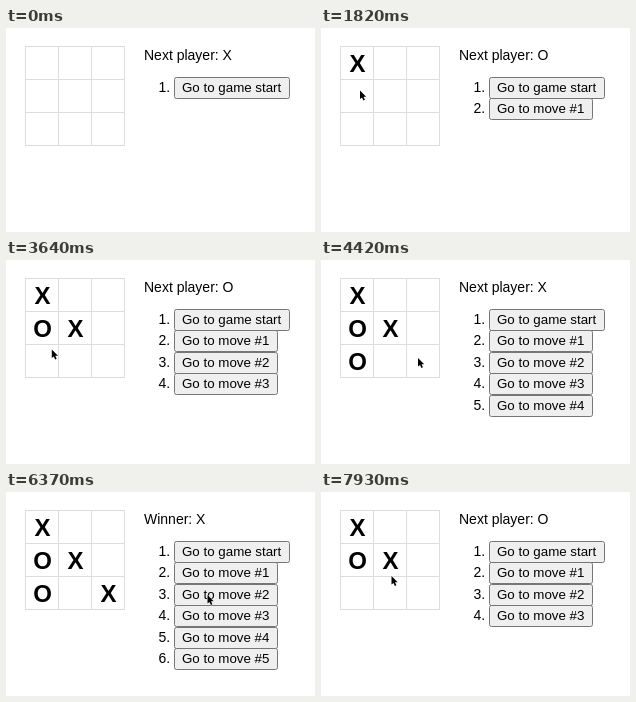
Animation of 309x204 px, one loop 8 s. Source, as an HTML page:

```html
<!DOCTYPE html>
<html lang="en">
<head>
<meta charset="utf-8">
<title>Tic-tac-toe with history</title>
<style>
  html, body { margin: 0; width: 100%; height: 100%; overflow: hidden; background: #fff; }
  svg { display: block; width: 309px; height: 204px; }
  text { font: 14px "Liberation Sans", Arial, sans-serif; fill: #000; }
  .label { font-size: 13.333px; }
  .mark { font-size: 24px; font-weight: bold; text-anchor: middle; }
  .grid { fill: none; stroke: #ddd; }
  .button { fill: #efefef; stroke: #767676; }
  .cursor { fill: #000; stroke: #fff; stroke-width: 1; paint-order: stroke; stroke-linejoin: round; }
</style>
</head>
<body>
<svg viewBox="0 0 309 204">
  <path class="grid" d="M19 18.5H119M19 51.5H119M19 84.5H119M19 117.5H119M19.5 18V118M52.5 18V118M85.5 18V118M118.5 18V118"/>
  <g id="marks"></g>
  <text id="status" x="138" y="32"></text>
  <g id="history"></g>
  <path id="cursor" class="cursor" d="M0 0V8.6L2 6.9L3.4 10L4.9 9.3L3.5 6.3H6.2Z"/>
</svg>
<script>
  const LOOP = 8000, TICK = 130;
  const $ = id => document.getElementById(id);

  // Board squares in order of play; X starts.
  const moves = [0, 3, 4, 6, 8];

  // [time, moves on the board, history buttons]
  const states = [
    [0, 0, 1], [1430, 1, 2], [2600, 2, 3], [3380, 3, 4],
    [4030, 4, 5], [4940, 5, 6], [6760, 2, 6], [7670, 3, 4]
  ];

  // [time, x, y] of the pointer tip
  const path = [
    [130, 3, 156], [780, 38, 38], [1430, 38, 38], [1820, 39, 62.5],
    [2080, 41, 71], [2600, 41, 71], [2990, 48.5, 74], [3380, 68, 68],
    [3770, 38, 97], [4030, 38, 97], [4420, 97, 98], [5070, 97, 98],
    [5590, 133, 92], [5980, 180, 97], [6370, 201.5, 103], [6500, 203, 104],
    [6760, 203, 104], [7540, 69, 70], [7670, 69, 70], [7930, 70.5, 84]
  ];

  function add(parent, tag, attrs, content = "") {
    const el = document.createElementNS("http://www.w3.org/2000/svg", tag);
    for (const key in attrs) el.setAttribute(key, attrs[key]);
    el.textContent = content;
    parent.append(el);
    return el;
  }

  const player = i => (i % 2 ? "O" : "X");

  const marks = moves.map((square, i) => add($("marks"), "text", {
    class: "mark",
    x: 36.5 + 33 * (square % 3),
    y: 44 + 33 * Math.floor(square / 3)
  }, player(i)));

  const rows = Array.from({ length: 6 }, (_, i) => {
    const row = add($("history"), "g", {});
    const top = Math.round(49 + 21.4 * i);
    add(row, "text", { x: 152.4, y: top + 15 }, `${i + 1}.`);
    add(row, "rect", { class: "button", x: 168.5, y: top + 0.5, width: i ? 103 : 115, height: 21, rx: 2 });
    add(row, "text", { class: "label", x: 176, y: top + 15 }, i ? `Go to move #${i}` : "Go to game start");
    return row;
  });

  function showFirst(items, count) {
    items.forEach((el, i) => el.setAttribute("visibility", i < count ? "visible" : "hidden"));
  }

  function pointerAt(t) {
    const next = path.findIndex(p => p[0] > t);
    if (next < 0) return path[path.length - 1].slice(1);
    const [t0, x0, y0] = path[next - 1], [t1, x1, y1] = path[next];
    const k = (t - t0) / (t1 - t0), e = k * k * (3 - 2 * k);
    return [x0 + (x1 - x0) * e, y0 + (y1 - y0) * e];
  }

  function draw(now) {
    const t = Math.floor((now % LOOP) / TICK) * TICK;
    const [, step, buttons] = states.filter(s => s[0] <= t).pop();
    showFirst(marks, step);
    showFirst(rows, buttons);
    $("status").textContent = step === moves.length ? "Winner: X" : `Next player: ${player(step)}`;

    const visible = t >= path[0][0];
    $("cursor").setAttribute("visibility", visible ? "visible" : "hidden");
    if (visible) $("cursor").setAttribute("transform", `translate(${pointerAt(t)})`);
  }

  const start = performance.now();
  function frame() {
    draw(performance.now() - start);
    requestAnimationFrame(frame);
  }
  frame();
</script>
</body>
</html>
```
